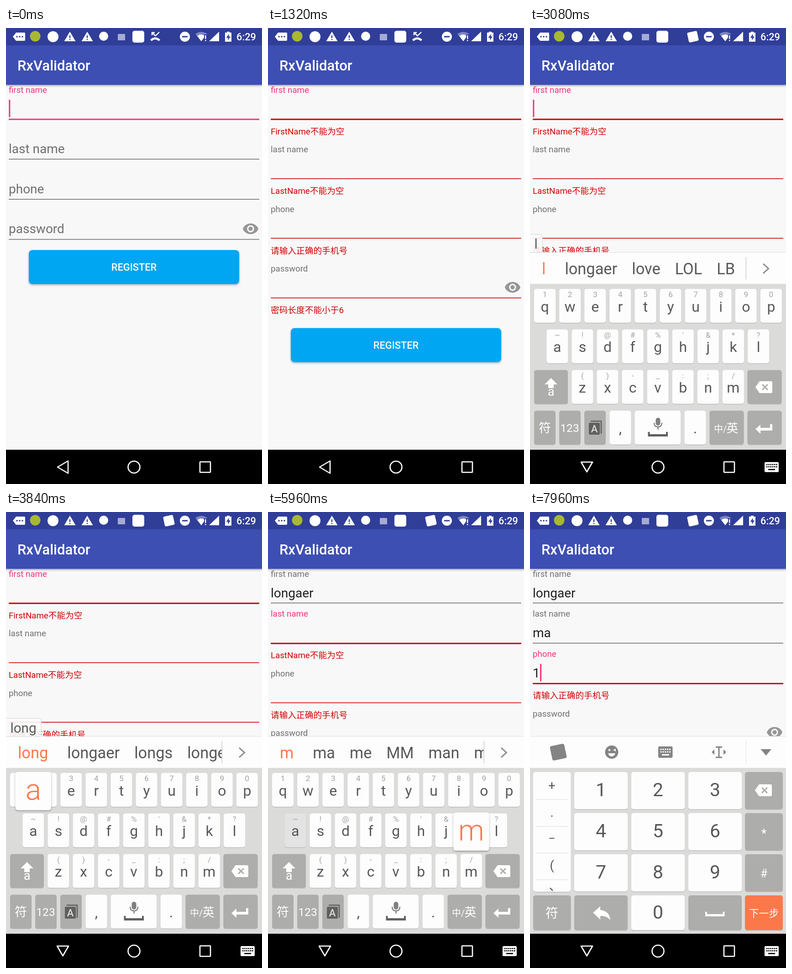
An HTML page that plays this animation: 561 px wide and 998 px high, repeating every 8 s.

```html
<!DOCTYPE html>
<html lang="zh-CN">
<head>
<meta charset="utf-8">
<title>Form validation</title>
<style>
html, body { margin: 0; width: 100%; height: 100%; overflow: hidden; background: #000; }
svg { display: block; width: 561px; height: 998px; }
text { font-family: Roboto, "Noto Sans CJK SC", "Noto Sans CJK", "Noto Sans", sans-serif; white-space: pre; }
.mid { text-anchor: middle; }
.bold { font-weight: 500; }
.thin { font-weight: 300; }
</style>
</head>
<body>
<svg id="stage" viewBox="0 0 561 998">
  <defs>
    <filter id="shade" x="-20%" y="-20%" width="140%" height="150%">
      <feDropShadow dx="0" dy="2" stdDeviation="2" flood-opacity=".32"/>
    </filter>
    <clipPath id="strip"><rect x="0" y="491" width="473" height="69"/></clipPath>
  </defs>
  <rect width="561" height="998" fill="#f8f8f9"/>
  <g id="form"></g>
  <g id="bars"></g>
  <rect y="923" width="561" height="75"/>
  <g id="board"></g>
  <g id="nav" fill="none" stroke="#fff" stroke-width="2.6" stroke-linejoin="round"></g>
</svg>
<script>
const LOOP = 8000;
const PINK = '#f73378', RED = '#d00000', GREY = '#707070', ORANGE = '#fb784a', INK = '#585858', CAP = '#adadab';

const $ = id => document.getElementById(id);
function el(parent, tag, attrs = {}, text) {
  const node = document.createElementNS('http://www.w3.org/2000/svg', tag);
  set(node, attrs);
  if (text !== undefined) node.textContent = text;
  parent.append(node);
  return node;
}
function set(node, attrs) {
  for (const k in attrs) node.setAttribute(k, attrs[k]);
}
const show = (node, on) => node.setAttribute('visibility', on ? 'inherit' : 'hidden');
const group = (parent, attrs) => el(parent, 'g', attrs);
const path = (parent, d, fill = '#fff', more = {}) => el(parent, 'path', { d, fill, ...more });
const rect = (parent, x, y, width, height, fill, rx = 0, more = {}) =>
  el(parent, 'rect', { x, y, width, height, fill, rx, ...more });
const dot = (parent, cx, cy, r, fill = '#fff') => el(parent, 'circle', { cx, cy, r, fill });
const label = (parent, str, x, y, size, fill, cls = '') =>
  el(parent, 'text', { x, y, 'font-size': size, fill, class: cls }, str);
const clamp = v => Math.max(0, Math.min(1, v));
const ease = (t, start, span) => 1 - (1 - clamp((t - start) / span)) ** 2;

// Timeline
const ERRORS_AT = 880;
const fields = [
  { hint: 'first name', error: 'FirstName不能为空', fixed: 4400, value: 'longaer', typed: 4400 },
  { hint: 'last name', error: 'LastName不能为空', fixed: 6400, value: 'ma', typed: 6400 },
  { hint: 'phone', error: '请输入正确的手机号', fixed: 1e5, value: '1', typed: 7720 },
  { hint: 'password', error: '密码长度不能小于6', fixed: 1e5, value: '', typed: 1e5 }
];
const FOCUS = [0, 4960, 6690];
const BLINK_STARTS = [-206, 4400, 4960, 6400, 6690, 7720];
const BLINK = 508;
const BOARD_AT = 2100, BOARD_SPAN = 270, DIGITS_AT = 6720;
const PRESSES = [
  ['l', 2840], ['o', 3120], ['n', 3320], ['g', 3560], ['a', 3800], ['e', 3960], ['r', 4120],
  ['m', 5840], ['a', 5960]
];
const WORDS = {
  l: 'longaer love LOL LB', lo: 'love longaer long look', lon: 'long longaer lone longer',
  long: 'longaer longs longed', longa: 'longaer longan', longae: 'longaer', longaer: '',
  m: 'ma me MM man my', ma: 'man may make made'
};

// Form
const form = $('form');
for (const f of fields) {
  f.g = group(form);
  f.label = label(f.g, f.hint, 6, 0, 18.7, GREY);
  f.text = label(f.g, f.value, 6, 51.5, 28, '#202020');
  f.line = rect(f.g, 6, 63.4, 549, 1.6, GREY);
  f.note = label(f.g, f.error, 6, 97.5, 18.7, RED);
}
path(fields[3].g, 'M12 4.5C7 4.5 2.73 7.61 1 12c1.73 4.39 6 7.5 11 7.5s9.27-3.11 11-7.5c-1.73-4.39-6-7.5-11-7.5zM12 17a5 5 0 1 1 0-10 5 5 0 0 1 0 10zm0-8a3 3 0 1 0 0 6 3 3 0 0 0 0-6z',
  '#969696', { transform: 'translate(517.3 22.3) scale(1.558)' });
const caret = rect(form, 6.3, 0, 3, 38, PINK);
const button = group(form);
rect(button, 50, 0, 461, 74.5, '#03a6f2', 8, { filter: 'url(#shade)' });
const flash = rect(button, 50, 0, 461, 74.5, '#fff', 8, { opacity: 0 });
label(button, 'REGISTER', 280.5, 45, 21.8, '#fff', 'mid bold');

// Status and title bars
const bars = $('bars');
rect(bars, 0, 38, 561, 86.5, '#3e4fb3', 0, { filter: 'url(#shade)' });
rect(bars, 0, 0, 561, 38, '#303e98');
label(bars, 'RxValidator', 25, 93, 31, '#fff', 'bold');
path(bars, 'M15 19L22 10H40Q42 10 42 12V26Q42 28 40 28H22Z');
for (const x of [24, 30, 36]) dot(bars, x, 19, 1.8, '#303e98');
dot(bars, 64, 18, 11.5, '#a9b832');
dot(bars, 103, 19, 12);
for (const x of [140, 178]) {
  path(bars, `M${x} 8L${x + 12.5} 29H${x - 12.5}Z`);
  rect(bars, x - 1.2, 16, 2.4, 6, '#303e98');
  rect(bars, x - 1.2, 24, 2.4, 2.4, '#303e98');
}
dot(bars, 214, 18, 10);
rect(bars, 245, 13, 16, 14, '#a5abd2', 1);
rect(bars, 277, 6, 26, 26, '#fff', 5);
const missed = group(bars, { stroke: '#fff' });
path(missed, 'M320 16V10H326M320 10L327.5 17L336 9', 'none', { 'stroke-width': 2.4 });
path(missed, 'M317.5 27Q327 18.5 336.5 27', 'none', { 'stroke-width': 4.5 });
const imeMark = rect(bars, 346, 8, 22, 22, '#fff', 3, { transform: 'rotate(-12 357 19)' });
dot(bars, 392, 19, 11);
rect(bars, 386, 17.5, 12, 3, '#303e98');
path(bars, 'M415 13Q428 4 441 13L428 29Z', '#7d86bf');
path(bars, 'M419 17.5Q428 11 436 17.5L428 29Z');
rect(bars, 434, 14, 6, 16, '#303e98');
rect(bars, 436, 16, 2.4, 8, '#fff');
rect(bars, 436, 26, 2.4, 2.6, '#fff');
path(bars, 'M467 8V29H445Z');
path(bars, 'M484 8H490V10H494V30H480V10H484Z');
path(bars, 'M488.5 13L482.5 21.5H486.5V27L492 18.5H488.5Z', '#303e98');
label(bars, '6:29', 505, 27, 21.8, '#fff', 'bold');

// Navigation bar
const nav = $('nav');
const backArrow = el(nav, 'path', { d: 'M113 961L136 947.5V974.5Z' });
const downArrow = el(nav, 'path', { d: 'M112 950H137L124.5 971.5Z' });
el(nav, 'circle', { cx: 280.5, cy: 961, r: 13 });
rect(nav, 425, 949.5, 23, 23, 'none', 1);
const boardMark = group(nav, { stroke: 'none' });
rect(boardMark, 514, 950, 31, 22, '#fff', 2.5);
for (let i = 0; i < 12; i++) rect(boardMark, 518 + (i % 6) * 4.2, 954 + (i / 6 | 0) * 5, 2.6, 2.6, '#000');
rect(boardMark, 522, 965, 15, 2.6, '#000');

// Keyboard
const board = $('board');
rect(board, 0, 560, 561, 363, '#dbdbda');
rect(board, 0, 491, 561, 69, '#fdfdfd');
rect(board, 0, 490.5, 561, 1, '#dedede');

const keys = {};
function cap(parent, x, y, w, h, fill = '#fdfdfd') {
  rect(parent, x, y + 1.5, w, h, '#bdbdc0', 5);
  return rect(parent, x, y, w, h, fill, 5);
}
function bracket(parent, x, y, w, fill) {
  path(parent, `M${x} ${y}h4v5h${w - 8}v-5h4v10h${-w}z`, fill);
}
function eraser(parent, x, y) {
  path(parent, `M${x} ${y}l9 -13h25q3 0 3 3v20q0 3 -3 3h-25z`);
  path(parent, `M${x + 15} ${y - 6}l12 12m0 -12l-12 12`, 'none', { stroke: CAP, 'stroke-width': 3 });
}

const letters = group(board);
const ROW_TOP = 571, ROW_STEP = 88.8;
const ROWS = [
  [9, 'qwertyuiop', '1234567890'],
  [36.3, 'asdfghjkl', "~!@#%'&*?"],
  [91.3, 'zxcvbnm', '()-_:;/']
];
ROWS.forEach(([x0, chars, marks], row) => {
  const y = ROW_TOP + ROW_STEP * row;
  [...chars].forEach((c, i) => {
    const x = x0 + 55.1 * i, mid = x + 23.5;
    keys[c] = { cap: cap(letters, x, y, 47, 74), mid, y };
    label(letters, marks[i], mid, y + 18, 17, '#a2a2a2', 'mid');
    label(letters, c, mid, y + 49.5, 32, INK, 'mid');
  });
});
cap(letters, 9, 748.6, 74, 74, CAP);
path(letters, 'M46 766L60 780H52V788H40V780H32Z');
label(letters, 'a', 46, 805, 27, '#fff', 'mid');
cap(letters, 476.5, 748.6, 75, 74, CAP);
eraser(letters, 494, 786);
for (const [x, w, fill] of [[9, 47, CAP], [64, 47, CAP], [119, 47, CAP], [174.5, 47], [229.5, 100.5], [338.5, 47], [393.5, 75, CAP], [476.5, 75, CAP]])
  cap(letters, x, 837.6, w, 74, fill);
label(letters, '符', 32.5, 885, 27, '#fff', 'mid');
label(letters, '123', 87, 884, 24.5, '#fff', 'mid');
path(letters, 'M133 860.5H156V888', 'none', { stroke: '#606060', 'stroke-width': 2.5 });
rect(letters, 129, 864, 24, 26, '#606060', 2);
label(letters, 'A', 141, 885, 22, '#dcdcdc', 'mid bold');
label(letters, ',', 198, 887, 32, INK, 'mid');
label(letters, '.', 362, 887, 32, INK, 'mid');
rect(letters, 275.5, 853, 10, 17, '#808080', 5);
path(letters, 'M272 864Q272 873 280.5 873Q289 873 289 864M280.5 873V879', 'none', { stroke: '#808080', 'stroke-width': 2.4 });
bracket(letters, 258.5, 884, 43.5, '#606060');
label(letters, '中/', 403, 885, 20, '#fff');
label(letters, '英', 443.5, 885, 26, '#fff', 'mid');
path(letters, 'M494 878L505 868V875H526V867H531V881H505V888Z');

const digits = group(board);
cap(digits, 7, 569, 82.5, 262);
[['+', 608], ['.', 667], ['−', 724], ['(', 783], ['、', 828]].forEach(([c, y], i) => {
  label(digits, c, i === 4 ? 55 : 48, y, 27, INK, 'mid');
  if (i < 4) rect(digits, 12, 629 + 58.4 * i, 72, 1, '#dadada');
});
const COLS = [97, 222, 347];
for (let n = 1; n < 10; n++) {
  const x = COLS[(n - 1) % 3], y = 569 + 90 * ((n - 1) / 3 | 0);
  keys[n] = { cap: cap(digits, x, y, 117, 81.5) };
  label(digits, n, x + 58.5, y + 53, 41, INK, 'mid');
}
for (const y of [569, 659, 749]) cap(digits, 471, y, 83, 81.5, CAP);
eraser(digits, 493, 609);
label(digits, '*', 512.5, 713, 27, '#fff', 'mid');
label(digits, '#', 512.5, 800, 25, '#fff', 'mid');
for (const [x, w, fill] of [[7, 82.5, CAP], [97, 117, CAP], [222, 117], [347, 117, CAP], [471, 83, ORANGE]])
  cap(digits, x, 839, w, 76, fill);
label(digits, '符', 48, 888, 28, '#fff', 'mid');
label(digits, '0', 280.5, 890, 41, INK, 'mid');
label(digits, '下一步', 512.5, 886, 21.8, '#fff', 'mid');
path(digits, 'M138 877L154 863V871Q174 873 176 893Q168 883 154 884V892Z');
bracket(digits, 384, 875, 42.5, '#fff');

const tools = group(board);
rect(tools, 46, 509.5, 32, 32, '#848484', 4, { transform: 'rotate(-12 62 525.5)' });
dot(tools, 179, 525.5, 14.5, '#848484');
dot(tools, 174, 521, 2.3, '#fdfdfd');
path(tools, 'M188 518L182 521L188 524M171 528H187Q185 535 179 535Q173 535 171 528Z', '#fdfdfd');
rect(tools, 281, 513, 31.5, 25, '#848484', 3);
for (let i = 0; i < 10; i++) rect(tools, 285.5 + (i % 5) * 4.9, 518 + (i / 5 | 0) * 5.5, 3, 3, '#fdfdfd');
rect(tools, 289, 530, 16, 3, '#fdfdfd');
path(tools, 'M407 514.5H421M414 514.5V537M407 537H421', 'none', { stroke: '#848484', 'stroke-width': 3 });
path(tools, 'M398 525.5L404 519.5V531.5ZM430 525.5L424 519.5V531.5Z', '#848484');
path(tools, 'M505.5 519H529L517.2 533Z', '#848484');
rect(tools, 473, 500, 1, 51, '#e2e2e2');

const picks = group(board);
const pickText = el(group(picks, { 'clip-path': 'url(#strip)' }), 'text', { x: 26, y: 539, 'font-size': 34.4, fill: INK });
rect(picks, 472.5, 501, 1.6, 49, '#cfcfcf');
path(picks, 'M511 516L522.5 526.5L511 537', 'none', { stroke: '#8a8a8a', 'stroke-width': 3 });
const bubble = group(board);
const bubbleBox = rect(bubble, -6, 451.5, 34, 40, '#fbfbfb', 5, { stroke: '#d5d5d5', 'fill-opacity': .88 });
const bubbleText = label(bubble, '', 9.5, 482.5, 29.6, INK);
const popup = group(board);
rect(popup, -39, 0, 78, 83.5, '#fdfdfd', 5, { filter: 'url(#shade)' });
const popupText = label(popup, '', 0, 61, 64, ORANGE, 'mid thin');

let shownWord = '';
function setWord(word) {
  if (word === shownWord) return;
  shownWord = word;
  pickText.textContent = '';
  if (!word) return;
  el(pickText, 'tspan', { fill: ORANGE }, word);
  WORDS[word].split(' ').filter(Boolean).forEach((w, i) => el(pickText, 'tspan', { dx: i ? 32 : 42 }, w));
  bubbleText.textContent = word;
  bubbleBox.setAttribute('width', bubbleText.getComputedTextLength() + 26);
}

function drawForm(t) {
  const focus = FOCUS.filter(s => t >= s).length - 1;
  let y = 135;
  fields.forEach((f, i) => {
    const bad = t >= ERRORS_AT && t < f.fixed, active = i === focus;
    const up = i ? ease(t, ERRORS_AT, 200) : 1;
    set(f.g, { transform: `translate(0 ${y})` });
    set(f.label, { y: 51 - 44.5 * up, 'font-size': 28 - 9.3 * up, fill: active ? PINK : GREY });
    set(f.line, { height: active ? 3 : 1.6, fill: bad ? RED : active ? PINK : GREY });
    set(f.note, { opacity: bad ? ease(t, ERRORS_AT, 200) : 0 });
    show(f.text, t >= f.typed);
    if (active) {
      const width = t >= f.typed ? f.text.getComputedTextLength() : 0;
      set(caret, { x: 6.3 + width, y: y + 22 });
    }
    y += bad ? 130.5 : 87.8;
  });
  const start = BLINK_STARTS.filter(s => t >= s).pop();
  show(caret, Math.floor((t - start) / BLINK) % 2 === 0);
  set(button, { transform: `translate(0 ${y - 0.2})` });
  set(flash, { opacity: t > 760 && t < 1120 ? .16 * (1 - Math.abs(t - 900) / 220) : 0 });
}

function drawBoard(t) {
  const rise = ease(t, BOARD_AT, BOARD_SPAN), open = t >= BOARD_AT;
  set(board, { opacity: rise, transform: `translate(0 ${81 * (1 - rise)})` });
  show(board, open);
  show(downArrow, open);
  show(backArrow, !open);
  show(boardMark, open);
  show(imeMark, t >= 2320);
  show(missed, t < 2320);
  show(letters, t < DIGITS_AT);
  show(digits, t >= DIGITS_AT);

  // A key greys at once, its popup follows and the letter lands on release.
  const since = t < 4400 ? 0 : 4400, until = t < 4400 ? 4400 : 6400;
  const run = PRESSES.filter(([, s]) => s >= since && s < until);
  const word = t < until ? run.filter(([, s]) => t >= s + 80).map(p => p[0]).join('') : '';
  setWord(word);
  show(picks, word);
  show(tools, !word);
  show(bubble, word && t >= run[0][1] + 160);

  for (const [c] of PRESSES) set(keys[c].cap, { fill: '#fdfdfd' });
  for (const [c, s] of PRESSES) if (t >= s && t < s + 40) set(keys[c].cap, { fill: '#e3e3e3' });
  set(keys[1].cap, { fill: t >= 7640 && t < 7760 ? '#e3e3e3' : '#fdfdfd' });
  const last = PRESSES.filter(([, s]) => t >= s + 40 && t < s + 160).pop();
  show(popup, last);
  if (last) {
    const key = keys[last[0]];
    popupText.textContent = last[0];
    set(popup, { transform: `translate(${key.mid} ${key.y - 91})` });
  }
}

const began = performance.now();
function frame() {
  const t = (performance.now() - began) % LOOP;
  drawForm(t);
  drawBoard(t);
  requestAnimationFrame(frame);
}
frame();
</script>
</body>
</html>
```
